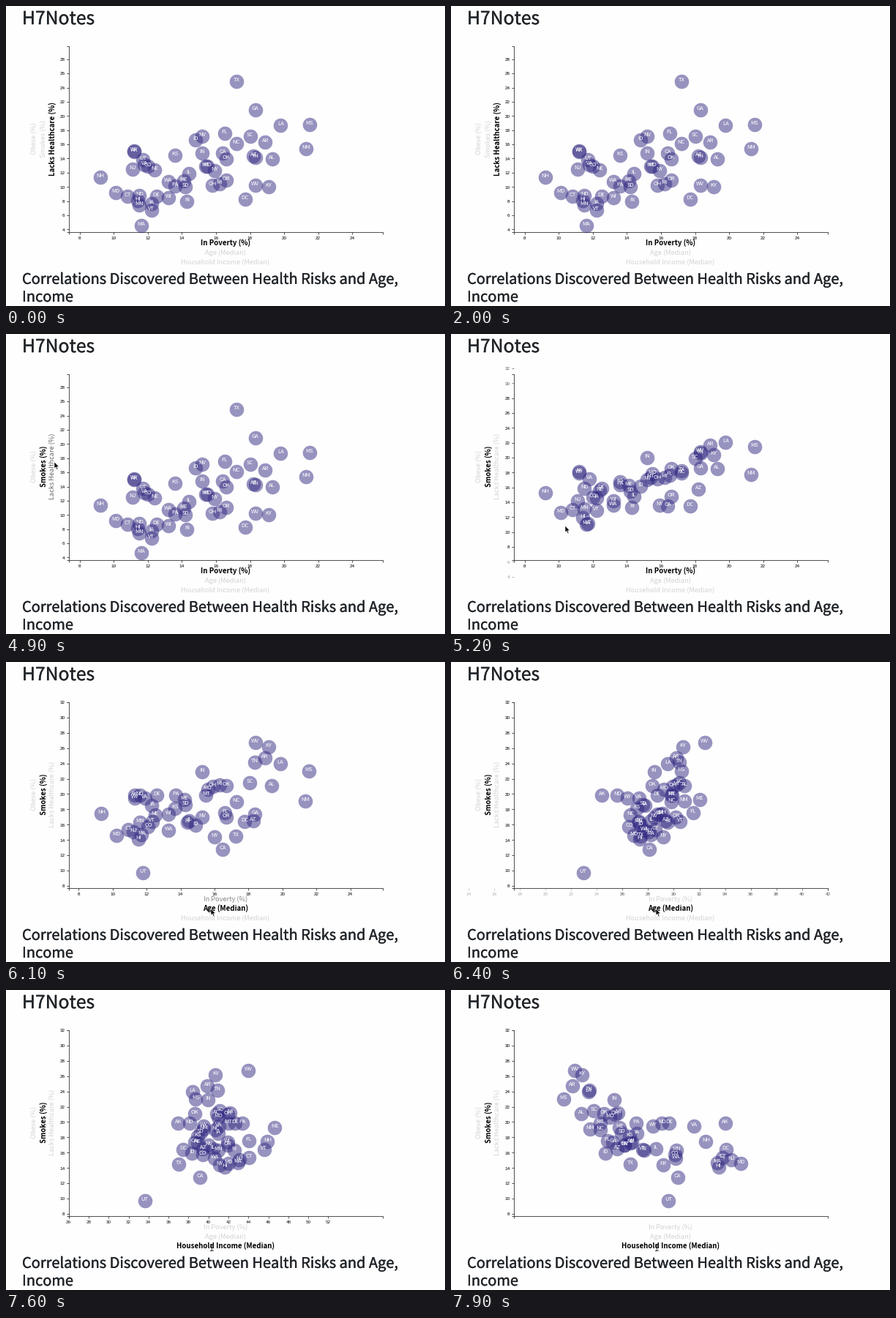
These frames come from a looping animation (600 by 410 pixels, 8 s). A matplotlib script:

```python
import math
import numpy as np
import matplotlib.pyplot as plt
from matplotlib.animation import FuncAnimation
from matplotlib.patches import Polygon
from matplotlib.patheffects import withStroke

W, H, DPI = 600, 410, 80  # both sides divide exactly in binary
STEP, LOOP = 100, 8000
PX = 72 / DPI
LEFT, RIGHT, TOP, BOTTOM = 86, 515, 54.5, 308.5
CLIP = (21, 534)
SANS, TICK_FONT = "Noto Sans CJK JP", "Liberation Sans"
INK, FADED, HOVER = 0.0, 0.83, 0.42
MOVE_MS, LAG_MS, FADE_MS = 652, 14, 140

STATES = """AL AK AZ AR CA CO CT DE DC FL GA HI ID IL IN IA KS KY LA ME MD MA MI
MN MS MO MT NE NV NH NJ NM NY NC ND OH OK OR PA RI SC SD TN TX UT VT VA WA WV WI
WY""".split()

DATA = {
    "poverty": [
        19.3, 11.2, 18.2, 18.9, 16.4, 12, 10.8, 12.5, 17.7, 16.5, 18.3, 11.4,
        14.8, 14.4, 15.2, 12.2, 13.6, 19.1, 19.8, 14.1, 10.1, 11.6, 16.2, 11.5,
        21.5, 15.5, 15.4, 12.4, 15.2, 9.2, 11.1, 21.3, 15.9, 17.2, 11.5, 15.8,
        16.6, 16.6, 13.6, 14.3, 18, 14.2, 18.3, 17.2, 11.7, 12.2, 11.8, 13.2,
        18.3, 13.2, 11.2],
    "age": [
        38.6, 33.3, 36.9, 37.8, 36, 36.3, 40.5, 39.6, 33.8, 41.6, 36.1, 38.1,
        35.9, 37.5, 37.4, 38.2, 36.2, 38.5, 36.1, 44.1, 38.2, 39.4, 39.6, 37.8,
        36.7, 38.5, 39.6, 36.2, 37.4, 42.5, 39.4, 37.2, 38.1, 38.3, 35.1, 39.4,
        36.2, 39.3, 40.7, 39.8, 38.8, 36.6, 38.6, 34.3, 30.5, 42.8, 37.7, 37.5,
        41.9, 39.2, 36.6],
    "income": [
        42830, 71583, 50068, 41262, 61933, 61303, 70048, 59716, 71648, 47463,
        49321, 69592, 47861, 57444, 49446, 53712, 52504, 42958, 44555, 49462,
        73971, 69160, 49847, 61481, 39680, 48363, 46328, 52686, 51450, 66532,
        71919, 44803, 58878, 46556, 59029, 49308, 47529, 51075, 53234, 54891,
        45238, 50979, 44361, 53035, 60922, 54166, 64902, 61366, 41059, 52622,
        57055],
    "healthcare": [
        13.9, 15, 14.4, 16.3, 14.8, 12.9, 8.7, 8.7, 8.3, 17.6, 20.9, 8.1,
        16.6, 11.9, 14.8, 7.7, 14.5, 10, 18.7, 10.9, 9.2, 4.6, 10.4, 7.4,
        18.8, 12.9, 12.9, 12.4, 17.1, 11.4, 12.5, 15.4, 12.3, 16.1, 8.8, 10.2,
        13.9, 11, 10.1, 8, 17.1, 10, 14.2, 24.9, 13.8, 6.7, 13.1, 10.7,
        10.2, 8.5, 15.1],
    "smokes": [
        21.1, 19.9, 16.5, 24.7, 12.8, 15.7, 15.4, 19.9, 16.4, 17.6, 17.4, 14.1,
        15.9, 16.5, 22.9, 18.5, 18.1, 26.2, 24, 19.3, 14.6, 14.7, 21.2, 16.3,
        23, 20.6, 19.9, 17.3, 17, 17.5, 15.1, 19.1, 14.4, 19, 19.9, 21,
        21.1, 17, 19.9, 16.3, 21.5, 18.6, 24.2, 14.5, 9.7, 16.4, 19.5, 15.3,
        26.7, 17.4, 19.5],
}
DATA = {k: np.array(v, float) for k, v in DATA.items()}

# (time of the click, measure shown from then on)
X_CLICKS = [(-9999, "poverty"), (6010, "age"), (7400, "income")]
Y_CLICKS = [(-9999, "healthcare"), (4831, "smokes")]

LABELS = {
    "poverty": ("In Poverty (%)", 300, 327.3, 0),
    "age": ("Age (Median)", 300, 340.3, 0),
    "income": ("Household Income (Median)", 300, 352.8, 0),
    "healthcare": ("Lacks Healthcare (%)", 66.5, 181, 90),
    "smokes": ("Smokes (%)", 54.5, 181, 90),
    "obesity": ("Obese (%)", 41.5, 181, 90),
}
HOVERS = [("smokes", 4600, 4831), ("income", 7050, 7400)]

# time, x, y, pointer shape from then on
POINTER = [
    (0, 187, 208, None), (900, 187, 208, "arrow"), (1300, 45, 166, "arrow"),
    (1700, 182.5, 195.5, "arrow"), (2000, 182.5, 195.5, None),
    (2900, 227, 222, "arrow"), (3300, 99, 376, "arrow"),
    (3800, 197, 262, "beam"), (3850, 193, 257, "arrow"),
    (4600, 51, 160, "hand"), (4850, 51, 160, "arrow"),
    (5200, 156, 262, "arrow"), (6000, 280, 337, "arrow"),
    (6700, 280, 337, "arrow"), (7050, 283, 349, "hand"),
    (7399, 283, 349, "hand"), (7400, 281.5, 352, "beam"),
    (8000, 281.5, 352, "beam"),
]
ARROW = np.array([(0, 0), (0, 9.2), (2.1, 7.3), (3.6, 10.8), (5, 10.2),
                  (3.6, 6.8), (6.4, 6.8)])
HAND = np.array([(-.9, 0), (.9, 0), (1, 4), (4.8, 5), (5.2, 8.5), (4, 12),
                 (-1.5, 12), (-4, 7.6), (-3, 6.7), (-1, 8.5)])
BEAM = np.array([(-2, -4.5), (0, -4), (2, -4.5), (0, -4), (0, 4), (-2, 4.5),
                 (0, 4), (2, 4.5)])


def ease(t):
    t = min(max(t, 0), 1)
    return 4 * t ** 3 if t < 0.5 else 1 - 4 * (1 - t) ** 3


def lerp(a, b, p):
    return a + (b - a) * p


def place(key, values):
    """Pixel position of values on the axis that shows this measure."""
    lo, hi = DATA[key].min() * 0.8, DATA[key].max() * 1.2
    f = (values - lo) / (hi - lo)
    if key in ("healthcare", "smokes"):
        return BOTTOM - f * (BOTTOM - TOP)
    return LEFT + f * (RIGHT - LEFT)


def tick_values(key):
    step = 5000 if key == "income" else 2
    lo, hi = DATA[key].min() * 0.8, DATA[key].max() * 1.2
    return set(range(math.ceil(lo / step) * step, math.floor(hi) + 1, step))


def phase(clicks, t):
    """Previous measure, current measure, progress between, time since click."""
    i = max(k for k, c in enumerate(clicks) if c[0] <= t)
    since = t - clicks[i][0]
    old = clicks[max(i - 1, 0)][1]
    return old, clicks[i][1], ease((since - LAG_MS) / MOVE_MS), since


def tick_state(old, new, p):
    before, after = tick_values(old), tick_values(new)
    out = []
    for v in sorted(before | after):
        alpha = 1 if v in before & after else p if v in after else 1 - p
        out.append((v, lerp(place(old, v), place(new, v), p), alpha))
    return out


fig = plt.figure(figsize=(W / DPI, H / DPI), dpi=DPI, facecolor="#fefefe")
ax = fig.add_axes([0, 0, 1, 1])
ax.set_xlim(0, W)
ax.set_ylim(H, 0)
ax.axis("off")


def write(x, y, s, size, font=SANS, **kw):
    return ax.text(x, y, s, fontsize=size * PX, fontfamily=font,
                   va="baseline", rotation_mode="anchor", **kw)


def stroke(xs, ys, **kw):
    return ax.plot(xs, ys, color="#333333", lw=0.85 * PX,
                   solid_capstyle="butt", **kw)[0]


heavy = [withStroke(linewidth=0.35 * PX, foreground="#212529")]
for y, s, size in ((25, "H7Notes", 24.7),
                   (379.8, "Correlations Discovered Between Health Risks and Age,", 20),
                   (404, "Income", 20)):
    write(22, y, s, size, color="#212529", path_effects=heavy)

stroke([LEFT - 3.5, LEFT, LEFT, LEFT - 3.5], [TOP, TOP, BOTTOM, BOTTOM])
stroke([LEFT, LEFT, RIGHT, RIGHT],
       [BOTTOM + 3.5, BOTTOM, BOTTOM, BOTTOM + 3.5])

names = {k: write(x, y, s, 9.2, ha="center", rotation=r)
         for k, (s, x, y, r) in LABELS.items()}
x_ticks = [(stroke([], []), write(0, 0, "", 6.4, TICK_FONT, ha="center"))
           for _ in range(30)]
y_ticks = [(stroke([], []), write(0, 0, "", 6.4, TICK_FONT, ha="right"))
           for _ in range(30)]

dots = ax.scatter(DATA["poverty"], DATA["smokes"], s=(19.6 * PX) ** 2,
                  color="#322a82", alpha=0.5, linewidths=0, zorder=3)
tags = [write(0, 0, s, 7.6, color="white", ha="center", zorder=4)
        for s in STATES]

shape = ax.add_patch(Polygon(ARROW, closed=True, lw=0.6 * PX, zorder=6))
beam = ax.plot([], [], color="#333333", lw=0.8 * PX, zorder=6)[0]


def draw_ticks(pool, state, horizontal):
    for line, text in pool:
        line.set_visible(False)
        text.set_visible(False)
    for (line, text), (v, pos, alpha) in zip(pool, state):
        if horizontal and not CLIP[0] < pos < CLIP[1]:
            continue
        if horizontal:
            line.set_data([pos, pos], [BOTTOM, BOTTOM + 3.5])
            text.set_position((pos, 318.9))
        else:
            line.set_data([LEFT - 3.5, LEFT], [pos, pos])
            text.set_position((80.5, pos + 2.3))
        text.set_text(f"{v:,}")
        for part in (line, text):
            part.set_alpha(alpha)
            part.set_visible(alpha > 0.01)


def draw_names(t, axes):
    for key, text in names.items():
        grey, bold = FADED, False
        for old, new, _, since in axes:
            if key == new:
                grey, bold = INK, True
            elif key == old:
                grey = lerp(INK, FADED, min(since / FADE_MS, 1))
        for hovered, start, end in HOVERS:
            if key == hovered and start <= t < end:
                grey = HOVER
        text.set_color((grey,) * 3)
        text.set_fontweight("bold" if bold else "normal")
        text.set_fontsize((9.7 if bold else 9.2) * PX)


def draw_pointer(t):
    times, xs, ys, kinds = zip(*POINTER)
    at = np.array([np.interp(t, times, xs), np.interp(t, times, ys)])
    kind = [k for start, k in zip(times, kinds) if start <= t][-1]
    shape.set_visible(kind in ("arrow", "hand"))
    beam.set_visible(kind == "beam")
    if kind == "beam":
        beam.set_data(*(BEAM + at).T)
    elif kind:
        hand = kind == "hand"
        shape.set_xy((HAND if hand else ARROW) + at)
        shape.set_facecolor("white" if hand else "black")
        shape.set_edgecolor("#555555" if hand else "white")


def draw(frame):
    t = frame * STEP
    across, up = phase(X_CLICKS, t), phase(Y_CLICKS, t)
    x, y = (lerp(place(old, DATA[old]), place(new, DATA[new]), p)
            for old, new, p, _ in (across, up))
    dots.set_offsets(np.column_stack([x, y]))
    for tag, cx, cy in zip(tags, x, y):
        tag.set_position((cx, cy))
    draw_ticks(x_ticks, tick_state(*across[:3]), True)
    draw_ticks(y_ticks, tick_state(*up[:3]), False)
    draw_names(t, (across, up))
    draw_pointer(t)
    return []


anim = FuncAnimation(fig, draw, frames=LOOP // STEP, interval=STEP,
                     repeat=True, repeat_delay=0, blit=False)
plt.show()
```
